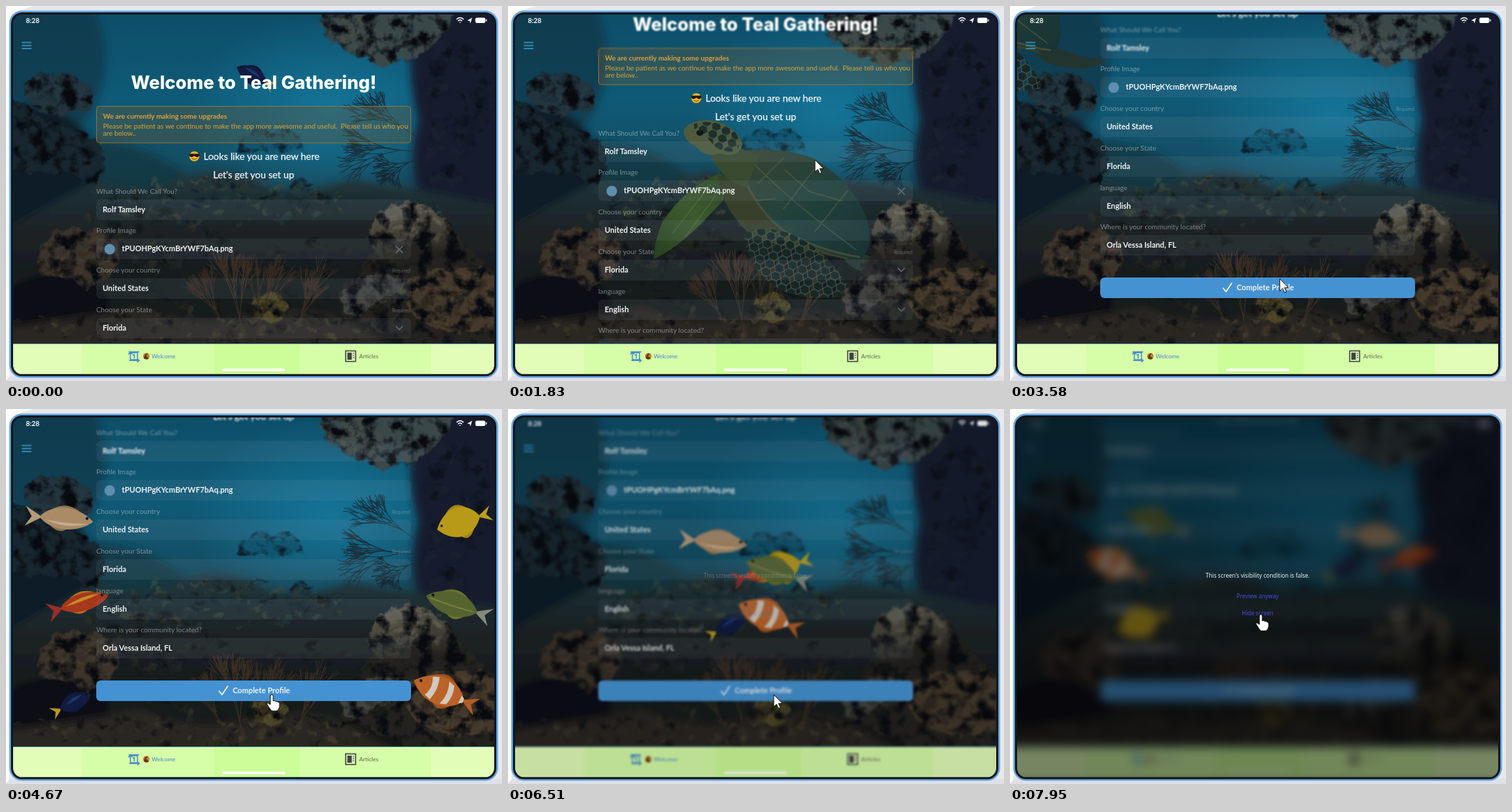
An HTML page that plays this animation: 698 by 529 pixels, repeating every 8000 ms.

```html
<!DOCTYPE html>
<html lang="en">
<head>
<meta charset="utf-8">
<title>Reef profile form</title>
<style>
  html, body { margin: 0; width: 100%; height: 100%; overflow: hidden; background: #e8e8ec; }
  #stage { position: relative; width: 698px; height: 529px; overflow: hidden; }
  #stage > svg { position: absolute; left: 0; top: 0; }
  #screen { position: absolute; left: 9px; top: 11px; width: 679px; height: 510px; overflow: hidden; border-radius: 12px; background: #0c0e12; }
  #scene { display: block; overflow: visible; }
  text { font-family: Lato, "Open Sans", sans-serif; white-space: pre; }
  .title { font: 800 25.3px Inter, "Open Sans", sans-serif; fill: #fff; text-anchor: middle; }
  .lead { font-size: 13.5px; fill: #f4f8f9; stroke: #f4f8f9; stroke-width: .25px; }
  .alert { font-size: 9.8px; fill: #d8a23a; }
  .label { font-size: 9.8px; fill: #b9c6ca; fill-opacity: .6; }
  .need { font-size: 6.6px; fill: #b9c6ca; fill-opacity: .4; text-anchor: end; }
  .value { font-size: 10.8px; font-weight: 700; fill: #f0f4f5; }
  .tab { font-size: 8.1px; }
  .note { font-family: "Open Sans", "Noto Sans", sans-serif; font-size: 8.05px; text-anchor: middle; }
  .mid { text-anchor: middle; }
  .line { fill: none; stroke-linecap: round; stroke-linejoin: round; }
</style>
</head>
<body>
<div id="stage">
<svg width="698" height="529"><path d="M0 0H38L14 8Q5 12 5 24V529H0Z" fill="#fdfdfd"/><path d="M5 522H698V529H0Z" fill="#dfe0e8"/></svg>

<div id="screen">
<svg id="scene" width="679" height="510" viewBox="9 11 679 510">
  <defs>
    <linearGradient id="sea" x2="0" y2="1">
      <stop offset="0" stop-color="#0d4c66"/><stop offset=".25" stop-color="#0f5a77"/>
      <stop offset=".42" stop-color="#144d62"/><stop offset=".54" stop-color="#1d3640"/>
      <stop offset=".7" stop-color="#191f22"/><stop offset="1" stop-color="#161616"/>
    </linearGradient>
    <radialGradient id="glow"><stop stop-color="#167ba0" stop-opacity=".8"/><stop offset="1" stop-color="#167ba0" stop-opacity="0"/></radialGradient>
    <linearGradient id="floor" x2="0" y2="1"><stop stop-color="#22373d"/><stop offset=".35" stop-color="#1a2123"/><stop offset="1" stop-color="#171615"/></linearGradient>
    <linearGradient id="stone" x2=".3" y2="1"><stop stop-color="#6d6a5c"/><stop offset=".5" stop-color="#454238"/><stop offset="1" stop-color="#211f1c"/></linearGradient>
    <linearGradient id="shell" x2="1" y2="1"><stop stop-color="#3b452f"/><stop offset=".5" stop-color="#21413c"/><stop offset="1" stop-color="#183232"/></linearGradient>
    <linearGradient id="limb" x1="1" x2="0" y2="1"><stop stop-color="#2b4526"/><stop offset=".5" stop-color="#3d5a2e"/><stop offset="1" stop-color="#24401f"/></linearGradient>
    <pattern id="scales" width="15" height="12" patternUnits="userSpaceOnUse" patternTransform="rotate(25)">
      <path d="M0 6L4 0H11L15 6L11 12H4Z" fill="#172726" stroke="#5a6f5c" stroke-width=".8"/>
    </pattern>
    <filter id="soft" x="-10%" y="-10%" width="120%" height="120%"><feGaussianBlur stdDeviation="6"/></filter>
    <filter id="rough" filterUnits="userSpaceOnUse" x="0" y="0" width="700" height="530" color-interpolation-filters="sRGB">
      <feTurbulence type="fractalNoise" baseFrequency=".05" numOctaves="4" seed="5" result="noise"/>
      <feGaussianBlur in="SourceGraphic" stdDeviation="1.2"/>
      <feDisplacementMap in2="noise" scale="20" xChannelSelector="R" yChannelSelector="G" result="rock"/>
      <feColorMatrix in="noise" values="0 0 0 0 .03  0 0 0 0 .04  0 0 0 0 .06  0 0 3.6 0 -1.6"/>
      <feComposite in2="rock" operator="in" result="shade"/>
      <feMerge><feMergeNode in="rock"/><feMergeNode in="shade"/></feMerge>
    </filter>
    <filter id="haze" filterUnits="userSpaceOnUse" x="0" y="0" width="698" height="90"><feGaussianBlur stdDeviation="1.3"/></filter>
    <clipPath id="top"><path d="M9 11H688V70H9Z"/></clipPath>
    <clipPath id="rest"><path d="M9 70H688V476H9Z"/></clipPath>
    <g id="form"></g>
  </defs>

  <path d="M-10 -8H708V540H-10Z" fill="url(#sea)"/>
  <ellipse cx="455" cy="150" rx="200" ry="140" fill="url(#glow)"/>
  <g filter="url(#soft)">
    <ellipse cx="30" cy="75" rx="110" ry="130" fill="#0a3449" opacity=".75"/>
    <path d="M578 -10H720V310L600 295Q558 245 580 160Q560 90 578 -10Z" fill="#161f2e"/>
    <path d="M-10 145Q70 130 112 178Q142 250 125 330H-10Z" fill="#0f1b26"/>
    <path d="M125 190Q200 195 250 235L230 300H110Z" fill="#16323d" opacity=".7"/>
    <path d="M-10 320Q60 280 130 245Q190 275 250 240Q320 222 370 258Q430 268 480 245Q560 255 710 285V490H-10Z" fill="url(#floor)"/>
    <ellipse cx="70" cy="420" rx="75" ry="42" fill="#0b0d12"/>
    <path d="M-10 490V455Q110 440 190 425Q260 455 330 440Q430 420 480 445L560 490Z" fill="#2a2822"/>
  </g>
  <g filter="url(#rough)">
    <path d="M443 0Q436 44 470 52Q482 72 510 66Q516 90 532 90Q552 72 580 74Q602 60 640 0Z" fill="#3b484a"/>
    <path d="M28 112Q38 92 74 95Q114 98 123 128Q128 150 92 152Q78 160 60 148Q22 146 28 112Z" fill="#22343d"/>
    <path d="M0 134Q40 140 56 165Q98 160 125 190Q150 210 125 250Q80 230 0 235Z" fill="#18272f"/>
    <path d="M330 190Q350 172 380 178Q412 165 420 208H330Z" fill="#12506a" opacity=".7"/>
    <path d="M44 362Q44 318 92 313Q150 310 160 350Q158 384 130 388Q118 406 96 384Q48 390 44 362Z" fill="#3c332a"/>
    <g id="reef"></g>
  </g>
  <g class="line" id="fans"></g>

  <g id="turtle">
    <path d="M478 338Q520 362 570 368Q560 384 510 378Q480 372 470 352Z" fill="#23352f"/>
    <path d="M298 236Q250 255 217 305Q206 332 205 357Q240 342 284 294Q310 270 318 246Z" fill="url(#limb)"/>
    <path d="M296 240Q300 290 350 330L480 358L410 260Z" fill="#383f2a"/>
    <path d="M318 206Q372 196 428 214Q484 246 505 300Q516 340 496 358Q440 350 385 318Q340 284 318 206Z" fill="url(#shell)"/>
    <path class="line" d="M340 216Q390 270 490 344M352 250L388 214M388 286L436 224M432 318L478 260M390 232L425 262L470 275M376 272L350 274" stroke="#5d6647" stroke-width="1.4" opacity=".6"/>
    <path class="line" d="M320 212Q346 288 390 318Q440 346 494 354" stroke="#5a5a3a" stroke-width="3" opacity=".6"/>
    <path d="M282 206Q300 246 336 256L352 212L318 196Z" fill="#3a4a30"/>
    <path d="M247 175Q256 160 286 161Q320 168 330 194Q326 216 298 208Q276 214 264 198Q247 190 247 175Z" fill="#4d5a3c"/>
    <path d="M262 166Q290 158 318 176Q330 190 322 205Q296 208 284 190Q276 178 262 180Z" fill="url(#scales)" opacity=".85"/>
    <ellipse cx="270" cy="179" rx="5" ry="4" fill="#12191a"/>
    <path d="M332 322Q352 308 395 320Q440 338 472 385Q484 400 480 408Q430 418 386 402Q340 378 332 322Z" fill="url(#scales)"/>
    <path class="line" d="M285 252L232 320M292 268L250 325" stroke="#5f7a44" stroke-width="2" opacity=".4"/>
  </g>

  <g filter="url(#rough)">
    <path d="M466 412Q505 380 512 322Q520 282 566 277Q612 276 634 318Q654 360 700 372V480H560Q520 440 470 450Z" fill="#23221e"/>
    <path d="M510 322Q516 283 566 277Q616 276 634 322Q650 352 640 362Q590 350 566 326Q546 366 528 358Q506 346 510 322Z" fill="url(#stone)"/>
    <path d="M470 410Q505 368 548 378Q574 392 560 408Q524 406 500 436Q470 440 470 410Z" fill="#41413d"/>
    <path d="M562 400Q580 365 628 372Q668 366 700 384V452Q640 470 590 450Q556 430 562 400Z" fill="#44392b"/>
    <g id="stones"></g>
  </g>

  <g id="fish"></g>

  <path class="line" d="M23 51.5H35M23 55.7H35M23 59.9H35" stroke="#2f86a8" stroke-width="2"/>

  <g clip-path="url(#top)"><g filter="url(#haze)"><use href="#form"/></g></g>
  <g clip-path="url(#rest)"><use href="#form"/></g>

  <text x="28" y="24" font-size="9.6" font-weight="700" fill="#fff">8:28</text>
  <g class="line" stroke="#fff" stroke-width="1.5"><path d="M634.5 18.5Q639 14.5 643.5 18.5M636.5 20.8Q639 18.8 641.5 20.8M639 23V23.2"/></g>
  <path d="M649 20.5L656 16.5L653.5 24.5L652.5 21Z" fill="#fff"/>
  <rect x="660.5" y="16.5" width="14" height="7.5" rx="2" fill="#fff"/><path d="M676 18.7V21.8" stroke="#fff" stroke-width="1.3"/>

  <path d="M-10 476H708V527H-10Z" fill="#e1fdb8"/>
  <path d="M107 476H598V527H107Z" fill="#d6fda7"/>
  <path d="M293 476H413V527H293Z" fill="#ccfd98"/>
  <path d="M-10 476.5H708" stroke="#4e86a8" stroke-width="1.2"/>
  <g class="line" stroke="#3f87cf" stroke-width="1.4">
    <path d="M175 499V489H185M185 489V499H176M172.5 491L175 488.5L177.5 491M173 488H187M174 500H187M185 498L187.5 500L185 502M179 492.5L180.5 491.5V496.5"/>
  </g>
  <circle cx="197.5" cy="494" r="4.6" fill="#c9822b"/><path d="M194 497Q195 489 200 490L197 493.5L201 497Q198 500 194 497Z" fill="#5a3a1c"/>
  <text class="tab" x="205" y="497" fill="#3f87cf">Welcome</text>
  <path d="M478 486.5H492V501.5H478Z" fill="#dff3bd" stroke="#3d463c" stroke-width="1.5"/>
  <path d="M481 489.5H486V498.5H481ZM488 490H490M488 493H490M488 496H490" fill="#3d463c" stroke="#3d463c" stroke-width="1.2"/>
  <text class="tab" x="497" y="497" fill="#5a684f">Articles</text>
  <rect x="304" y="511.5" width="89" height="3.6" rx="1.8" fill="#fff"/>
</svg>
</div>

<svg width="698" height="529">
  <g fill="none">
    <rect x="5.8" y="7.8" width="685.4" height="515.4" rx="17" stroke="#62a8e4" stroke-width="2.6"/>
    <rect x="8.5" y="10.5" width="680" height="510.3" rx="14" stroke="#14161b" stroke-width="3"/>
  </g>
  <g id="notice">
    <text class="note" x="348.5" y="238" fill="#fff" font-weight="500">This screen's visibility condition is false.</text>
    <text class="note" x="348.5" y="267" fill="#4b50e6">Preview anyway</text>
    <text class="note" x="348.5" y="291" fill="#4b50e6">Hide screen</text>
  </g>
  <g id="cursor" fill="#fff" stroke="#111" stroke-linejoin="round">
    <path id="arrow" d="M0 0V17L4 13.5L6.7 19.5L9.3 18.3L6.7 12.5H12Z"/>
    <path id="hand" d="M-2 1Q0-1.5 2 1V9Q4 7.5 5.5 9.5Q7.5 8.5 8.5 10.5Q11 10 11 12.5V17Q10 22 7 23H0Q-3 20-7 13Q-6.5 10-2 14Z"/>
  </g>
</svg>
</div>

<script>
const $ = id => document.getElementById(id);
const LOOP = 8000;

// Seeded random numbers for the reef texture
let seed = 11;
const rnd = () => (seed = (seed * 16807) % 2147483647) / 2147483647;

function scatter(n, x, y, rx, ry, size, colors) {
  let out = '';
  for (let i = 0; i < n; i++) {
    const a = rnd() * 6.283, r = Math.sqrt(rnd()), s = size * (.4 + rnd());
    out += `<ellipse cx="${x + Math.cos(a) * r * rx}" cy="${y + Math.sin(a) * r * ry}" rx="${s}" ry="${s * (.4 + rnd() * .4)}" fill="${colors[i % colors.length]}" opacity=".5"/>`;
  }
  return out;
}

function branch(x, y, a, len, spread, depth) {
  if (!depth) return '';
  const x2 = x + Math.cos(a) * len, y2 = y + Math.sin(a) * len;
  let d = `M${x.toFixed(1)} ${y.toFixed(1)}L${x2.toFixed(1)} ${y2.toFixed(1)}`;
  for (const turn of [-spread, 0, spread])
    d += branch(x2, y2, a + turn + (rnd() - .5) * .35, len * (.7 + rnd() * .3), spread, depth - 1);
  return d;
}
const fan = (x, y, a, len, spread, color) =>
  `<path d="${branch(x, y, a, len, spread, 5)}" stroke="${color}"/>`;

$('reef').innerHTML =
  scatter(150, 315, 275, 175, 34, 6, ['#3a4d45', '#182a30', '#464d3b', '#23383c']) +
  scatter(80, 200, 325, 100, 45, 6, ['#2c312c', '#13191c', '#38362a']) +
  scatter(110, 320, 375, 200, 60, 6, ['#111618', '#28271f', '#1a2021']) +
  scatter(130, 280, 452, 270, 24, 6, ['#40392b', '#141414', '#2d2b24', '#544b37']) +
  scatter(45, 102, 350, 48, 30, 5, ['#4e4233', '#2a251f']) +
  scatter(40, 75, 122, 40, 24, 5, ['#2a3d46', '#15262e']) +
  scatter(60, 525, 40, 75, 25, 5, ['#545447', '#2b3f48', '#48493e']) +
  scatter(40, 640, 160, 50, 120, 12, ['#1a2130', '#141a28']) +
  '<ellipse cx="371" cy="426" rx="24" ry="21" fill="#4c4526"/>' +
  scatter(40, 371, 426, 20, 17, 3, ['#5e5730', '#38331f']);
$('stones').innerHTML =
  scatter(60, 572, 312, 50, 26, 5, ['#706c5d', '#464339', '#5b584b']) +
  scatter(110, 628, 415, 58, 38, 6, ['#524432', '#231f19', '#3a3226']) +
  scatter(40, 515, 405, 38, 22, 5, ['#4a4a45', '#282725']);
$('fans').innerHTML =
  fan(578, 185, 3.75, 25, .32, '#183340') + fan(580, 205, 3.2, 26, .28, '#1b303c') +
  fan(582, 215, 2.8, 17, .35, '#162834') +
  fan(320, 474, -2.1, 29, .2, '#352a22') + fan(335, 474, -1.75, 34, .17, '#3d3026') +
  fan(350, 474, -1.35, 28, .2, '#372b22') + fan(400, 474, -1.15, 27, .2, '#392d23');

// Form, laid out at scroll 0
const field = (y, label, value, x = 136) =>
  `<text class="label" x="127" y="${y + 3}">${label}</text>
   <rect x="127" y="${y + 11}" width="443" height="29" rx="6" fill="#93aabb" fill-opacity=".1"/>
   <text class="value" x="${x}" y="${y + 28.5}">${value}</text>`;
const chevron = y => `<path class="line" d="M549 ${y - 2}L553.5 ${y + 2.5}L558 ${y - 2}"/>`;

$('form').innerHTML = `
  <text class="title" x="348.5" y="117">Welcome to Teal Gathering!</text>
  <rect x="127.5" y="141.5" width="442" height="51.5" rx="4" fill="#5c5a44" fill-opacity=".4" stroke="#a87c2c" stroke-opacity=".8"/>
  <text class="alert" x="136.5" y="159" font-weight="700">We are currently making some upgrades</text>
  <text class="alert" x="136.5" y="173">Please be patient as we continue to make the app more awesome and useful.  Please tell us who you</text>
  <text class="alert" x="136.5" y="183">are below..</text>
  <circle cx="265" cy="212" r="7" fill="#f3b42c"/>
  <path d="M258 208.5H272V211.5Q269 215 265.5 211.5H264.5Q261 215 258 211.5Z" fill="#1b1712"/>
  <path class="line" d="M262 215.5Q265 217.5 268 215.5" stroke="#7a4a12"/>
  <text class="lead" x="278" y="217">Looks like you are new here</text>
  <text class="lead mid" x="348.5" y="243">Let's get you set up</text>
  ${field(262, 'What Should We Call You?', 'Rolf Tamsley')}
  ${field(317, 'Profile Image', 'tPUOHPgKYcmBrYWF7bAq.png', 163)}
  <circle cx="146" cy="343" r="7.5" fill="#5f8fae"/>
  ${field(373, 'Choose your country', 'United States')}
  ${field(429, 'Choose your State', 'Florida')}
  ${field(485, 'language', 'English')}
  ${field(540, 'Where is your community located?', 'Orla Vessa Island, FL')}
  <text class="need" x="569" y="376">Required</text><text class="need" x="569" y="432">Required</text>
  <g id="marks" stroke="#8d9aa3" stroke-opacity=".6" stroke-width="1.3">
    <path class="line" d="M549 339L558 348M558 339L549 348"/>${chevron(454)}${chevron(510)}
  </g>
  <rect x="127" y="611" width="443" height="29" rx="6" fill="#4592d2"/>
  <path class="line" d="M300 626L304 631L312 619" stroke="#fff" stroke-width="1.5"/>
  <text class="value" x="319" y="628.5">Complete Profile</text>`;

// Fish face right, centred on 0,0; keys are [time, x, y]
const body = h => `M-30 0C-16 ${-h} 22 ${-h * 1.15} 46 2C24 ${h * 1.1} -14 ${h} -30 0Z`;
const fins = h => `M-16 ${-h * .5}Q4 ${-h * 1.35} 26 ${-h * .6}ZM-16 ${h * .5}Q0 ${h * 1.35} 14 ${h * .6}Z`;
const tail = (w, x = -41) => `M-26 0L-50 ${-w}L${x} 0L-50 ${w}Z`;
const draw = (h, main, fin, end, w, extra = '') =>
  `<path d="${tail(w)}" fill="${end}"/><path d="${fins(h)}" fill="${fin}"/><path d="${body(h)}" fill="${main}"/>${extra}<circle cx="37" cy="-2" r="2" fill="#15120f"/>`;
const tang = draw(23, '#111b3f', '#0d1530', '#b89a1c', 14, '<path d="M-14-3Q8-14 28-6Q6 0-14-3Z" fill="#1d3470"/>');
const bars = '<path d="M24-14Q17 0 24 14L15 17Q9 0 15-17ZM0-17Q-7 0 0 17L-9 14Q-14 0-9-14ZM-24-6L-29-3V3L-24 6Z" fill="#cfc9bd"/>';

const shoal = [
  { art: draw(19, '#ab8a66', '#8d744f', '#b59a78', 14, '<path d="M-22 3Q10 16 40 5Q10 8-22 3Z" fill="#c4ad8c"/>'),
    turn: 4, keys: [[4670, 77, 154], [5640, 183, 187], [6870, 335, 187], [7950, 510, 178]] },
  { art: draw(17, '#a8381c', '#b87322', '#962f28', 15, '<path d="M-22-1Q8-11 34-5Q8-1-22-1Z" fill="#c48d28"/>'),
    turn: -17, size: .92, keys: [[4670, 103, 274], [5640, 248, 261], [6870, 405, 217], [7950, 560, 210]] },
  { art: tang, turn: -28, size: .64, keys: [[4670, 93, 415], [5640, 210, 357], [6870, 350, 285], [7950, 470, 225]] },
  { art: draw(31, '#b99a18', '#a58411', '#bd9d1e', 13), flip: 1,
    turn: -16, size: .83, keys: [[4670, 643, 158], [5640, 510, 187], [6870, 337, 238], [7950, 187, 300]] },
  { art: draw(21, '#55642f', '#6b722e', '#858a7c', 13, '<path d="M-24 1Q10 4 40 3" stroke="#7a8140" stroke-width="2" fill="none"/>'), flip: 1,
    turn: 20, keys: [[4670, 635, 277], [5640, 496, 263], [6870, 330, 215], [7950, 207, 160]] },
  { art: draw(25, '#bb6228', '#a0511f', '#b35c25', 13, bars), flip: 1,
    turn: 24, keys: [[4670, 617, 400], [5640, 501, 337], [6870, 312, 274], [7950, 150, 220]] },
  { art: tang, flip: 1, turn: 30, size: .62, keys: [[0, 350, 99], [1000, 290, 5]] }
];
$('fish').innerHTML = shoal.map(f => `<g>${f.art}</g>`).join('');
shoal.forEach((f, i) => f.node = $('fish').children[i]);

// Moments at which the picture changes: [first, last, steps], in whole hundredths
const ticks = [0];
for (const [a, b, n] of [[250, 970, 7], [1090, 1210, 2], [1460, 1580, 2], [1830, 1950, 2], [2180, 2180, 1],
  [2390, 2730, 4], [2980, 3700, 7], [3820, 4300, 5], [4550, 4670, 2], [4910, 5030, 2], [5280, 5400, 2],
  [5640, 5640, 1], [5890, 6010, 2], [6260, 6260, 1], [6510, 6990, 5], [7220, 7220, 1], [7470, 7950, 5]])
  for (let i = 0; i < n; i++) ticks.push(Math.floor((a + (b - a) * i / Math.max(1, n - 1)) / 10) * 10);

// Linear between keys; the end segments run on
function along(keys, t) {
  let i = 1;
  while (i < keys.length - 1 && t > keys[i][0]) i++;
  const a = keys[i - 1], b = keys[i], k = (t - a[0]) / (b[0] - a[0]);
  return a.slice(1).map((v, j) => v + (b[j + 1] - v) * k);
}
const scrollKeys = [[0, 0], [1400, 0], [1830, 82], [2180, 162], [2610, 225], [2980, 228], [LOOP, 228]];
const pointer = [[0, 820, 370], [370, 700, 320], [1090, 440, 222], [1830, 432, 217], [2610, 431, 221], [2950, 431, 221],
  [3650, 374, 403], [7350, 374, 403], [7950, 353, 290], [LOOP, 353, 290]];

function render(t) {
  const [dy] = along(scrollKeys, t);
  $('form').setAttribute('transform', `translate(0 ${-dy})`);
  $('marks').style.opacity = t < 2300 ? 1 : 0;

  const s = t - 1830;
  $('turtle').setAttribute('transform', `translate(${-s * .25} ${-s / 6})`);
  for (const f of shoal) {
    const [x, y] = along(f.keys, t), k = f.size || 1;
    f.node.setAttribute('transform', `translate(${x} ${y}) rotate(${f.turn}) scale(${f.flip ? -k : k} ${k})`);
  }

  const veil = Math.min(1, Math.max(0, (t - 6390) / 480));
  $('scene').style.filter = veil ? `blur(${7 * veil}px) brightness(${1 - .47 * veil})` : 'none';
  $('notice').style.opacity = veil;

  const [x, y] = along(pointer, t);
  $('cursor').setAttribute('transform', `translate(${x} ${y})`);
  const hand = (t >= 3600 && t < 6510) || t >= 7900;
  $('hand').style.display = hand ? '' : 'none';
  $('arrow').style.display = hand ? 'none' : '';
}

const start = performance.now();
let shown = -1;
function frame() {
  const now = (performance.now() - start) % LOOP;
  const t = ticks.filter(v => v <= now).pop();
  if (t !== shown) render(shown = t);
  requestAnimationFrame(frame);
}
frame();
</script>
</body>
</html>
```
